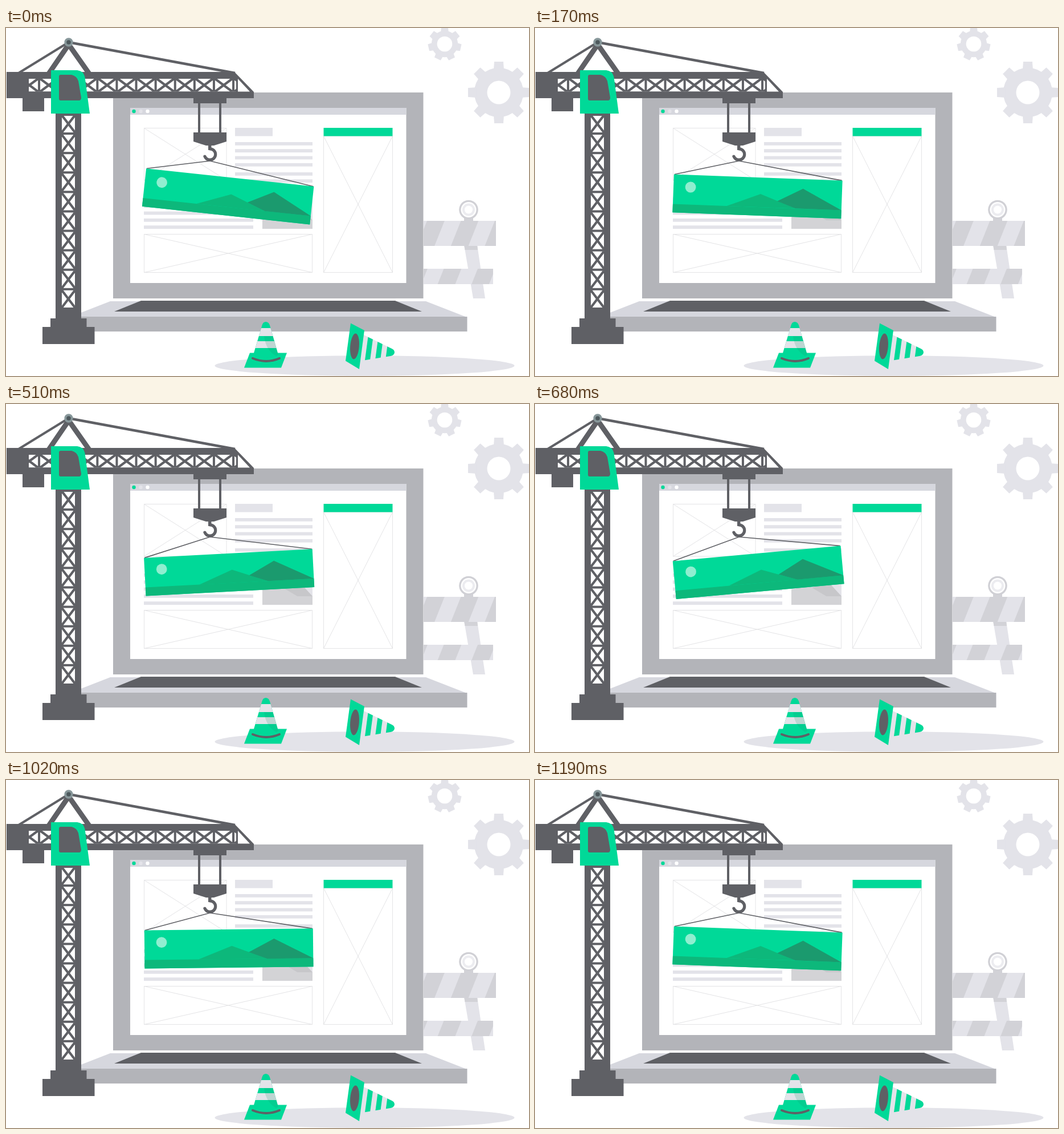
Recreate the animation shown at these times as an HTML page with a canvas. Size 918x610 px, loop 1360 ms.

```html
<!DOCTYPE html>
<html lang="en">
<head>
<meta charset="utf-8">
<title>Under construction</title>
<style>
  html, body { margin: 0; width: 100%; height: 100%; overflow: hidden; background: #fff; }
  canvas { display: block; }
</style>
</head>
<body>
<canvas id="stage" width="918" height="610"></canvas>
<script>
const ctx = document.getElementById('stage').getContext('2d');

const DARK = '#5f6065', GREEN = '#00d998', HILL = '#0db87b', PEAK = '#1b9a6e';
const GREY = '#b3b4b9', SILVER = '#d6d7de', PALE = '#e3e3e9', STRIPE = '#d2d2d7';
const OUTLINE = '#e4e4e6', WHITE = '#fff';

const STEP_MS = 170, STEPS = 8;
const TILT_START = 6.14, TILT_RANGE = 11.34;
const CELL = 34.1;

function rect(color, x1, y1, x2, y2) {
  ctx.fillStyle = color;
  ctx.fillRect(x1, y1, x2 - x1, y2 - y1);
}

function trace(points) {
  ctx.beginPath();
  points.forEach(([x, y]) => ctx.lineTo(x, y));
}

function poly(color, ...points) {
  trace(points);
  ctx.fillStyle = color;
  ctx.fill();
}

function line(color, width, ...points) {
  trace(points);
  ctx.strokeStyle = color;
  ctx.lineWidth = width;
  ctx.stroke();
}

function disc(color, x, y, rx, ry = rx, turn = 0) {
  ctx.beginPath();
  ctx.ellipse(x, y, rx, ry, turn, 0, Math.PI * 2);
  ctx.fillStyle = color;
  ctx.fill();
}

function fillPath(color, d) {
  ctx.fillStyle = color;
  ctx.fill(new Path2D(d));
}

function strokeRound(width, path) {
  ctx.strokeStyle = DARK;
  ctx.lineWidth = width;
  ctx.lineCap = 'round';
  ctx.stroke(path);
  ctx.lineCap = 'butt';
}

function trapezoid(color, cx, y1, half1, y2, half2) {
  poly(color, [cx - half1, y1], [cx + half1, y1], [cx + half2, y2], [cx - half2, y2]);
}

function clipped(path, draw) {
  ctx.save();
  ctx.clip(path);
  draw();
  ctx.restore();
}

function boxPath(x1, y1, x2, y2) {
  const path = new Path2D();
  path.rect(x1, y1, x2 - x1, y2 - y1);
  return path;
}

function gear(cx, cy, teeth, outer, toothWidth) {
  const body = outer * 0.8, half = toothWidth / 2;
  disc(PALE, cx, cy, body);
  for (let i = 0; i < teeth; i++) {
    ctx.save();
    ctx.translate(cx, cy);
    ctx.rotate(i * Math.PI * 2 / teeth);
    trapezoid(PALE, 0, -outer, half, -body + 4, half + 1);
    ctx.restore();
  }
}

function wireframe(x1, y1, x2, y2) {
  ctx.strokeStyle = OUTLINE;
  ctx.lineWidth = 1;
  ctx.strokeRect(x1, y1, x2 - x1, y2 - y1);
  line(OUTLINE, 1, [x1, y1], [x2, y2]);
  line(OUTLINE, 1, [x1, y2], [x2, y1]);
}

function textLines(x1, x2, y, count) {
  for (let i = 0; i < count; i++) rect(PALE, x1, y + i * 12.3, x2, y + i * 12.3 + 5.8);
}

function stripedBoard(x1, y1, x2, y2, firstStripe) {
  const period = 59.5, slant = (y2 - y1) * 0.4;
  clipped(boxPath(x1, y1, x2, y2), () => {
    rect(PALE, x1, y1, x2, y2);
    for (let x = firstStripe; x < x2 + slant; x += period) {
      const end = x + period / 2 + 1;
      poly(STRIPE, [x, y1], [end, y1], [end - slant, y2], [x - slant, y2]);
    }
  });
}

function barricade() {
  poly(PALE, [804, 380], [827, 380], [841, 474], [820, 474]);
  poly(STRIPE, [804, 380], [827, 380], [828, 389], [805.5, 389]);
  stripedBoard(733, 338, 860, 382, 739);
  stripedBoard(733, 422, 855, 449, 709);
  rect(STRIPE, 804, 331, 820, 339);
  disc('#d0d0d5', 812, 318.5, 16.8);
  disc(WHITE, 812, 318.5, 13.5);
  disc('#ececf0', 812, 318.5, 11);
  disc(WHITE, 812, 318.5, 7);
}

function laptop() {
  rect(GREY, 188, 113, 732.5, 474);
  rect(WHITE, 218, 140, 702.5, 447);
  rect(SILVER, 218, 140, 702.5, 152);
  [GREEN, PALE, WHITE].forEach((color, i) => disc(color, 224.5 + i * 12, 146, 3.2));
  trapezoid(SILVER, 460, 479, 277, 507, 349);
  trapezoid(DARK, 460, 478, 223, 497, 270);
  rect(GREY, 111, 506, 809.5, 532);
}

function page() {
  wireframe(242.5, 175.5, 387, 267);
  rect(PALE, 402, 175, 468, 189.5);
  textLines(402, 538, 200, 4);
  textLines(402, 538, 253, 2);
  textLines(242, 434, 297, 5);
  clipped(boxPath(450, 285, 538, 352), () => {
    rect(PALE, 450, 285, 538, 352);
    poly('#d3d3d6', [450, 326], [478, 317], [511, 337], [538, 337], [538, 352], [450, 352]);
    poly('#c7c7ca', [486, 322], [513, 310], [538, 337], [511, 337]);
  });
  wireframe(242.5, 361.5, 537.5, 428.5);
  wireframe(557.5, 189.5, 678.5, 428.5);
  rect(GREEN, 557.5, 175, 678.5, 189.5);
}

// A run of crossed cells along the x axis, centred on y = 0.
function lattice(x, y, turn, length, depth, firstCell) {
  const half = depth / 2, reach = CELL / 2 - 2;
  ctx.save();
  ctx.translate(x, y);
  ctx.rotate(turn);
  clipped(boxPath(0, -half, length, half), () => {
    rect(WHITE, 0, -half, length, half);
    for (let c = firstCell; c < length + reach; c += CELL) {
      line(DARK, 4.2, [c - reach, -half], [c + reach, half]);
      line(DARK, 4.2, [c - reach, half], [c + reach, -half]);
      rect(DARK, c + reach, -half, c + reach + 4, half);
    }
  });
  ctx.restore();
}

function tower() {
  rect(DARK, 87, 145, 132, 510);
  lattice(109.5, 154, Math.PI / 2, 336, 23, 14);
  rect(DARK, 78, 509, 141.5, 525);
  rect(DARK, 64, 524, 155.5, 554);
}

function jib() {
  line(DARK, 4, [110, 25], [22, 79]);
  line(DARK, 4.5, [110, 25], [402, 79]);
  line(DARK, 9, [75, 80], [110, 29], [146, 80]);
  poly(DARK, [1, 77], [401, 77], [435, 112], [435, 123], [1, 123]);
  rect(DARK, 29, 122, 67, 146);
  lattice(40, 100.2, 0, 364, 22.5, 1);
  poly(WHITE, [407, 89], [428, 111.5], [407, 111.5]);
  disc('#87979a', 110, 25, 7.7);
  disc('#4d585c', 110, 25, 3.8);
}

function cab() {
  fillPath(GREEN, 'M79 74H125Q136 75 138.5 86L147 150H79Z');
  fillPath(DARK, 'M93 85Q93 82 96 82H115Q124 84 127 93L132 122Q132 127 128 127H96Q93 127 93 124Z');
}

function hoist() {
  rect(DARK, 329, 122, 387, 132);
  for (const x of [337, 374]) rect(DARK, x, 131, x + 4, 184);
  rect(DARK, 329, 183, 387, 199);
  trapezoid(DARK, 358, 199, 29, 206, 7);
  rect(DARK, 355, 204, 360.5, 214);
  const hook = new Path2D();
  hook.arc(358, 221.5, 9.7, -Math.PI / 2, Math.PI * 0.88);
  strokeRound(5.2, hook);
}

function banner(tilt) {
  const turn = tilt * Math.PI / 180, c = Math.cos(turn), s = Math.sin(turn);
  const pivotX = 391, pivotY = 282.8, drop = 12.6;
  const halfW = 148, top = -33.5, bottom = 33.5, ground = 18.5;
  const corner = x => [
    pivotX + x * c - (top + drop) * s,
    pivotY + x * s + (top + drop) * c
  ];
  line(DARK, 1.6, corner(-halfW + 1), [358, 233], corner(halfW - 1));

  ctx.save();
  ctx.translate(pivotX, pivotY);
  ctx.rotate(turn);
  ctx.translate(0, drop);
  rect(GREEN, -halfW, top, halfW, bottom);
  disc('#8feed0', -118, -12, 9.4);
  rect(HILL, -halfW, ground, halfW, bottom);
  poly(HILL, [-53.5, ground], [5.3, -4.5], [67, ground]);
  poly(PEAK, [35, 6.7], [79.5, -16.5], [halfW, ground], [67, ground]);
  ctx.restore();
}

function standingCone() {
  poly(GREEN, [428, 569.5], [493, 569.5], [483, 595.5], [418, 595.5]);
  const body = new Path2D('M449.5 521Q451 515 456 515Q461 515 463 521L478 573Q457 585 434 573Z');
  clipped(body, () => {
    rect(GREEN, 430, 510, 482, 590);
    rect(PALE, 430, 526, 482, 540);
    rect(PALE, 430, 549, 482, 561);
    fillPath('rgba(20,150,105,.18)', 'M453 540Q456 566 476 576L480 576L470 540Z');
  });
  strokeRound(4, new Path2D('M433 579Q457 589 480 579'));
}

function fallenCone() {
  const body = new Path2D('M626 537L677 562Q682 564 682 569Q681 574 675 575L619 584Z');
  clipped(body, () => {
    rect(PALE, 615, 530, 690, 590);
    for (let x = 633; x < 680; x += 18) {
      const end = x > 660 ? 690 : x + 9;
      poly(GREEN, [x + 4, 530], [end + 4, 530], [end - 4, 590], [x - 4, 590]);
    }
  });
  poly(GREEN, [605, 517.5], [629, 530], [620, 598], [596, 583.5]);
  disc(DARK, 612, 558, 7.8, 22.5, 0.08);
}

// The swing leaves its first extreme fast and settles slowly at the other.
function tiltAt(time) {
  const step = Math.floor(time / STEP_MS) % STEPS;
  const progress = Math.min(step, STEPS - step) / (STEPS / 2);
  return TILT_START - TILT_RANGE * progress ** 0.75;
}

function draw(time) {
  rect(WHITE, 0, 0, 918, 610);
  gear(770, 28, 7, 29, 12);
  disc(WHITE, 770, 28, 13.3);
  gear(865, 113, 8, 54, 16);
  disc(WHITE, 865, 113, 20.5);
  barricade();
  laptop();
  page();
  tower();
  jib();
  cab();
  hoist();
  banner(tiltAt(time));
  disc(PALE, 629.5, 592, 263, 17.8);
  standingCone();
  fallenCone();
}

const start = performance.now();
function tick() {
  draw(performance.now() - start);
  requestAnimationFrame(tick);
}
tick();
</script>
</body>
</html>
```
